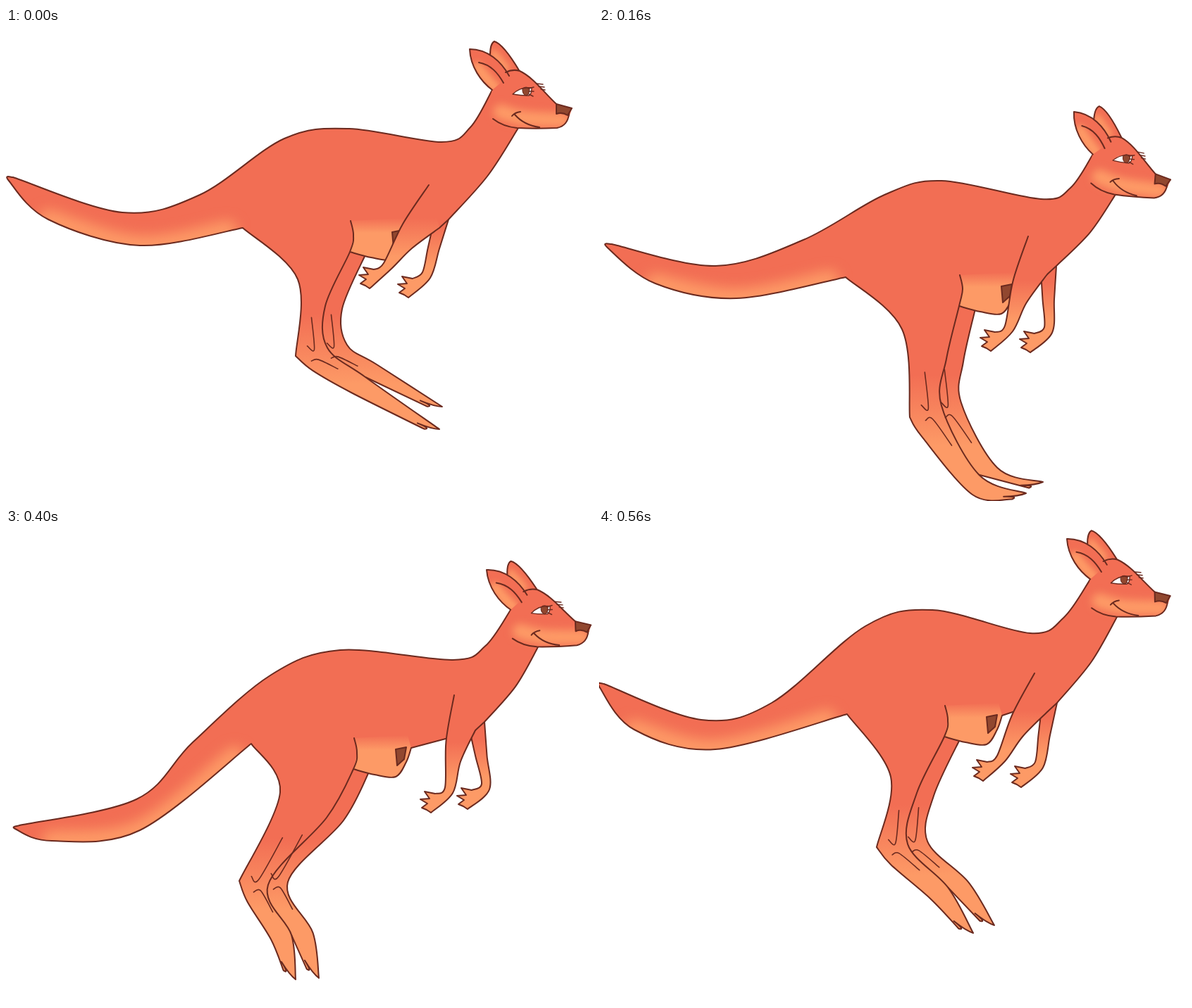
These frames come from a looping animation (833 by 672 pixels, 640 ms). An HTML page with a canvas:

```html
<!DOCTYPE html>
<html lang="en">
<head>
<meta charset="utf-8">
<title>Hopping kangaroo</title>
<style>
  html, body { margin: 0; width: 100%; height: 100%; overflow: hidden; background: #fff; }
  canvas { display: block; }
</style>
</head>
<body>
<canvas id="stage" width="833" height="672"></canvas>
<script>
const ctx = document.getElementById('stage').getContext('2d');
const RED = '#f26e54', LIGHT = '#fd9a66', INK = '#6b2a1f', BROWN = '#91472f';
const STEP = 80;

// A pose is a tilt of the head and a few joints; all contours are derived from these.
const JOINTS = ('head withers hump loin rump tail tip underTip underTail crotch ' +
  'bend heel knee ball toe farToe pouch shoulder hand chest farHand').split(' ');
const POSES = [
  [0, '658,30 618,162 487,143 395,157 275,237 165,262 4,217 60,272 190,309 336,284 ' +
    '414,357 411,466 453,395 490,518 615,570 619,538 488,318 600,223 516,370 628,272 571,383'],
  [-.4, '651,67 601,195 462,169 385,187 250,273 152,308 2,268 55,327 170,350 333,309 ' +
    '443,412 473,527 500,425 545,596 611,645 644,632 494,355 588,248 540,411 628,291 594,412'],
  [5, '674,119 627,243 486,217 405,237 290,301 165,338 12,312 80,363 195,384 350,354 ' +
    '430,428 441,553 493,470 530,663 606,661 630,645 511,395 609,296 556,459 649,338 612,461'],
  [2, '689,101 620,237 488,223 400,243 265,354 165,424 29,468 110,476 230,435 352,349 ' +
    '379,445 331,565 440,467 397,665 467,660 483,644 498,393 639,283 640,453 690,315 689,438'],
  [-2.2, '682,58 634,186 474,172 375,208 265,303 185,384 13,426 65,443 190,428 348,305 ' +
    '389,374 331,500 455,410 376,583 411,640 444,638 493,341 636,236 603,403 679,274 655,398'],
  [-1.2, '664,14 612,148 473,115 378,138 245,247 145,271 1,225 50,285 165,313 352,263 ' +
    '414,352 394,452 451,375 470,525 531,574 561,563 490,295 618,205 545,358 650,247 599,367']
];
// Order over one loop; halves are in-betweens.
const ORDER = [0, 1, 2, 2.5, 3, 4, 4.5, 5];

const FINGERS = [[-9, -30], [-2, -20], [-15, -19], [-5, -13], [-13, -7], [-6, -4], [0, 0]];
const POCKET = [[0, 0], [15, -3], [12, 14], [2, 23]];
const POUCH = [[0, 0], [30, 8], [60, 11], [75, -10], [82, -30]];

const HEAD = {
  farEar: 'M687,38 Q687,22 693,19 C703,22 716,40 728,60 L712,62',
  ear: 'M690,88 C674,76 659,55 658,30 C684,30 703,48 714,68',
  skull: 'M690,88 L709,63 Q719,58 729,61 C748,70 762,90 781,108 L803,114 Q797,139 782,142' +
    ' C760,143 743,143 725,142 Q705,140 691,129 L684,110 Z',
  muzzle: 'M690,88 L760,92 L781,108 L803,114 Q797,139 782,142 C760,143 743,143 725,142' +
    ' L715,150 L690,150 L676,122 L684,108 Z',
  lines: 'M709,63 Q719,58 729,61 C748,70 762,90 781,108 M799,122 Q797,139 782,142' +
    ' C760,143 743,143 725,142 Q705,140 691,129 M671,49 C688,52 698,64 706,78' +
    ' M718,125 Q722,120 730,119 M722,123 Q735,138 757,141',
  nose: 'M781,108 L803,114 L797,124 Q789,119 781,122 Z',
  eye: 'M719,94 Q730,83 746,85 Q746,94 742,96 Q730,96 719,94 Z',
  pupil: 'M733,86 Q738,82 743,86 Q743,95 738,96 Q732,94 733,86 Z',
  lashes: 'M741,86 L749,84 M742,90 L749,90 M742,94 L748,97 M753,79 L762,80 M756,83 L764,84 M759,87 L765,88'
};
for (const key in HEAD) HEAD[key] = new Path2D(HEAD[key]);

const add = ([x, y], dx, dy) => [x + dx, y + dy];
const sub = (a, b) => [a[0] - b[0], a[1] - b[1]];
const mix = (a, b, k = .5) => [a[0] + (b[0] - a[0]) * k, a[1] + (b[1] - a[1]) * k];
const unit = ([x, y]) => [x / Math.hypot(x, y), y / Math.hypot(x, y)];
// Moves a point along a direction and to its right-hand side.
const go = (p, [x, y], ahead, side) => add(p, x * ahead - y * side, y * ahead + x * side);
const shift = (pts, p) => pts.map(q => add(p, ...q));
const flip = pts => [...pts].reverse();

function poseAt(index) {
  const [tiltA, a] = POSES[Math.floor(index)], [tiltB, b] = POSES[Math.ceil(index)];
  const k = index % 1, ends = b.split(' '), pose = { tilt: tiltA + (tiltB - tiltA) * k };
  a.split(' ').forEach((p, i) => {
    pose[JOINTS[i]] = mix(p.split(',').map(Number), ends[i].split(',').map(Number), k);
  });
  return pose;
}

// Fills in the joints that follow from the others.
function rig(p) {
  const turn = new DOMMatrix().translate(...p.head).rotate(p.tilt).translate(-658, -30);
  const onHead = (x, y) => { const q = turn.transformPoint({ x, y }); return [q.x, q.y]; };
  const nape = onHead(690, 88), chin = onHead(727, 142);
  const foot = unit(sub(p.toe, p.ball)), shank = unit(sub(p.heel, p.bend));
  const tailEnd = add(p.tip, 6, -5);
  const ankle = add(go(p.heel, shank, 0, -45), 0, -13);
  const instep = go(p.ball, foot, 10, -28);
  const arch = sub(instep, mix(ankle, p.toe));
  const farAnkle = add(ankle, 28, -4);
  const farInstep = add(mix(farAnkle, p.farToe), ...arch);
  const pad = go(p.heel, unit(sub(p.ball, p.heel)), 32, 4);
  const inner = go(p.toe, foot, -20, 8);
  return {
    ...p, turn, foot, ankle, instep, farAnkle, inner,
    armpit: add(p.chest, -13, 12),
    belly: add(mix(p.shoulder, add(p.hand, 20, -36)), 0, -5),
    back: [nape, add(mix(nape, p.withers), 5, 16), p.withers, p.hump, p.loin, p.rump, p.tail, tailEnd],
    under: [tailEnd, p.tip, p.underTip, p.underTail, p.crotch],
    rear: [p.crotch, p.bend, p.heel],
    sole: [p.heel, pad, p.ball, inner],
    shin: [add(p.pouch, 1, -44), add(p.pouch, 5, -24), p.pouch, p.knee, ankle, instep, p.toe],
    farShin: [add(p.pouch, 24, 0), add(p.knee, 24, 4), farAnkle, farInstep, p.farToe],
    bag: shift(POUCH, p.pouch),
    throat: [chin, add(mix(chin, p.chest), 6, 3), p.chest]
  };
}

// Appends a smooth curve through the points, joined to what is already there.
function curve(path, pts, move = false) {
  path[move ? 'moveTo' : 'lineTo'](...pts[0]);
  for (let i = 0; i < pts.length - 1; i++) {
    const a = pts[i - 1] || pts[i], b = pts[i], c = pts[i + 1], d = pts[i + 2] || c;
    path.bezierCurveTo(b[0] + (c[0] - a[0]) / 6, b[1] + (c[1] - a[1]) / 6,
      c[0] - (d[0] - b[0]) / 6, c[1] - (d[1] - b[1]) / 6, ...c);
  }
}
const line = (path, pts) => pts.forEach(p => path.lineTo(...p));

function fade(from, to) {
  const g = ctx.createLinearGradient(0, from, 0, to);
  g.addColorStop(0, RED);
  g.addColorStop(1, LIGHT);
  return g;
}
function fill(path, color) { ctx.fillStyle = color; ctx.fill(path); }
function stroke(path, width = 2) { ctx.strokeStyle = INK; ctx.lineWidth = width; ctx.stroke(path); }

// Soft light band kept inside a shape.
function glow(shape, pts, width, blur) {
  const band = new Path2D();
  curve(band, pts, true);
  ctx.save();
  ctx.clip(shape);
  ctx.filter = `blur(${blur}px)`;
  ctx.strokeStyle = LIGHT;
  ctx.lineWidth = width;
  ctx.stroke(band);
  ctx.restore();
}

// Two rounded toes with a crease between them.
function toes(path, from, to, foot) {
  const mid = mix(from, to), root = go(mid, foot, -22, 0);
  path.quadraticCurveTo(...mid, ...root);
  path.quadraticCurveTo(...mid, ...to);
}

function drawArm(front, back, hand, bow) {
  const bend = add(hand, 20, -36), corner = add(hand, 31, -28);
  const shape = new Path2D();
  curve(shape, [front, add(mix(front, bend), bow, 0), bend, add(hand, 6, -27)], true);
  line(shape, shift(FINGERS, hand));
  curve(shape, [hand, corner, add(mix(back, corner), bow, 0), back]);
  fill(shape, fade(hand[1] - 100, hand[1] - 45));
  stroke(shape);
}

function drawFarLeg(p, color) {
  const shape = new Path2D(), inner = go(p.farToe, p.foot, -20, 8);
  curve(shape, flip(p.farShin), true);
  const outline = new Path2D();
  curve(outline, p.farShin, true);
  toes(outline, p.farToe, inner, p.foot);
  outline.lineTo(...p.instep);
  shape.addPath(outline);
  const area = new Path2D(outline);
  line(area, [mix(p.ball, p.instep), mix(p.heel, p.ankle), mix(p.bend, p.knee), add(p.pouch, 0, -15)]);
  fill(area, color);
  stroke(outline);
}

// Hooked line down the shank and a short one over the foot.
function tendons(path, p, offset) {
  const joint = add(mix(p.heel, p.ankle), ...offset);
  const calf = add(mix(p.bend, p.knee), ...offset), top = add(p.instep, ...offset);
  const low = mix(joint, calf, .04);
  curve(path, [mix(joint, calf, .58), add(low, 4, 0), add(low, -6, -5)], true);
  curve(path, [add(joint, 0, 13), add(joint, 10, 11), add(mix(joint, top, .45), 3, 8)], true);
}

function drawBody(p, color) {
  const shape = new Path2D();
  curve(shape, p.back, true);
  curve(shape, p.under);
  curve(shape, p.rear);
  curve(shape, p.sole);
  toes(shape, p.inner, p.toe, p.foot);
  const outline = new Path2D(shape);
  curve(outline, p.shin, true);
  curve(outline, p.bag, true);
  line(outline, [p.belly]);
  curve(outline, p.throat, true);
  line(outline, [p.armpit]);
  curve(shape, flip(p.shin));
  line(shape, [p.bag[4], p.belly, p.armpit]);
  curve(shape, flip(p.throat));
  fill(shape, color);
  glow(shape, [p.underTip, p.underTail, mix(p.underTail, p.crotch, .85)], 28, 9);

  const bag = new Path2D(), level = p.pouch[1];
  curve(bag, p.shin.slice(0, 3), true);
  curve(bag, p.bag);
  line(bag, [[p.bag[4][0] - 5, level - 48]]);
  fill(bag, fade(level - 48, level - 27));
  stroke(outline);

  const pocket = new Path2D();
  line(pocket, shift(POCKET, add(p.pouch, 60, -28)));
  pocket.closePath();
  fill(pocket, BROWN);
  stroke(pocket);

  const marks = new Path2D();
  tendons(marks, p, [0, 0]);
  tendons(marks, p, sub(p.farAnkle, p.ankle));
  stroke(marks, 1.6);
}

function drawHead(turn) {
  ctx.save();
  ctx.setTransform(turn);
  fill(HEAD.farEar, RED);
  glow(HEAD.farEar, [[692, 37], [709, 57]], 12, 4);
  stroke(HEAD.farEar);
  fill(HEAD.skull, RED);
  glow(HEAD.muzzle, [[702, 119], [735, 128], [790, 131]], 21, 6);
  fill(HEAD.ear, RED);
  glow(HEAD.ear, [[669, 56], [680, 70], [693, 84]], 16, 4);
  stroke(HEAD.ear);
  stroke(HEAD.lines);
  fill(HEAD.nose, BROWN);
  stroke(HEAD.nose);
  fill(HEAD.eye, '#fff');
  fill(HEAD.pupil, BROWN);
  stroke(HEAD.eye, 1.4);
  stroke(HEAD.pupil, 1);
  stroke(HEAD.lashes, 1.4);
  ctx.restore();
}

function draw(p) {
  ctx.fillStyle = '#fff';
  ctx.fillRect(0, 0, 833, 672);
  ctx.lineJoin = ctx.lineCap = 'round';
  const legs = fade(p.heel[1] - 60, p.heel[1] + 40);
  drawFarLeg(p, legs);
  drawArm(add(p.chest, -22, 8), p.chest, p.farHand, 0);
  drawBody(p, legs);
  drawArm(p.shoulder, p.armpit, p.hand, -5);
  drawHead(p.turn);
}

const poses = ORDER.map(index => rig(poseAt(index)));
function frame() {
  draw(poses[Math.floor(performance.now() / STEP) % poses.length]);
  requestAnimationFrame(frame);
}
frame();
</script>
</body>
</html>
```
